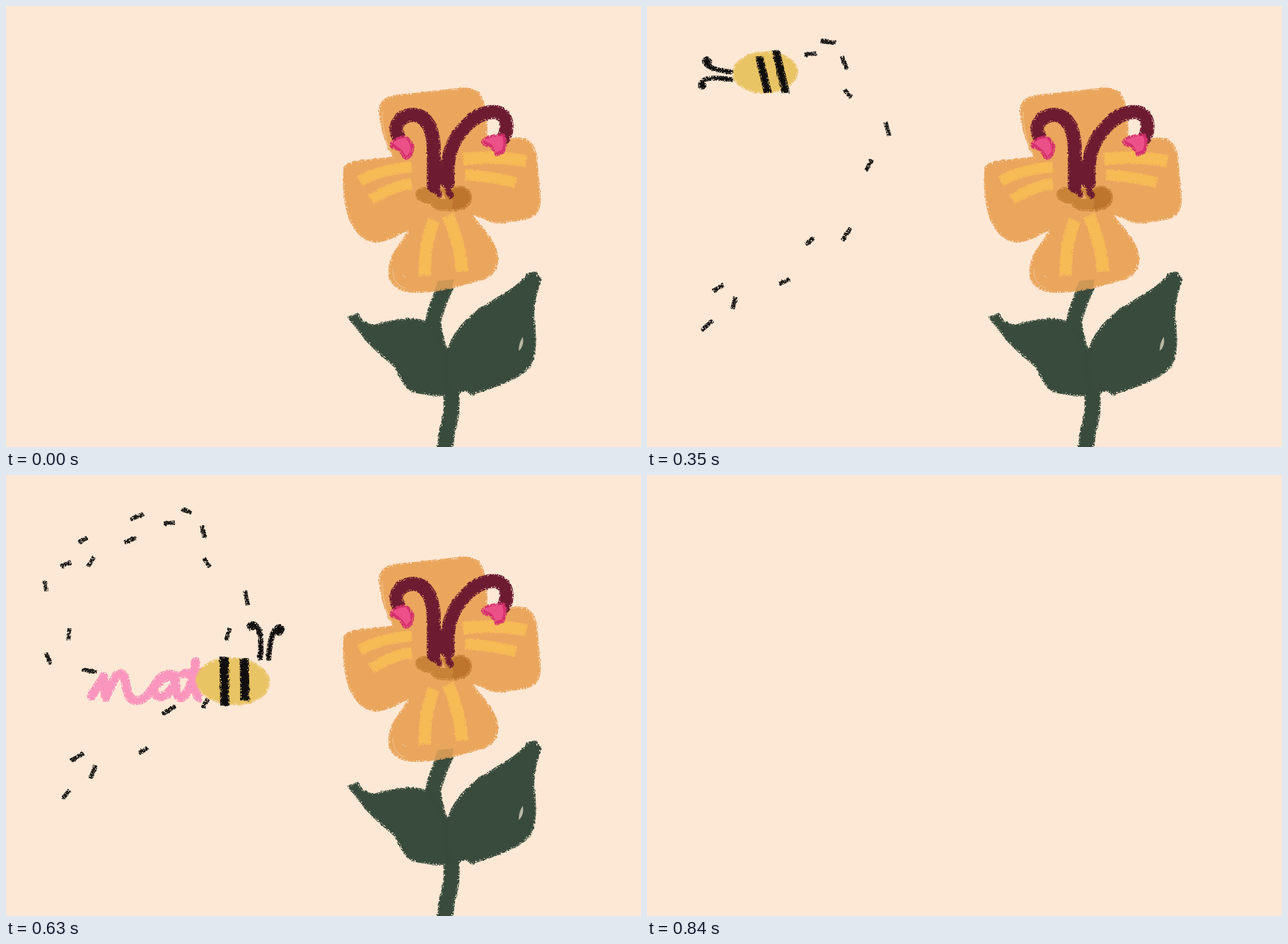
Write an HTML page that moves like this. It is 898x624 px and loops after 0.91 s.

```html
<!DOCTYPE html>
<html lang="en">
<head>
<meta charset="utf-8">
<title>Bee and flower</title>
<style>
html, body { margin: 0; width: 100%; height: 100%; overflow: hidden; background: #fde8d5; }
svg { display: block; width: 898px; height: 624px; }
.line { fill: none; stroke-linecap: round; stroke-linejoin: round; }
.band { fill: none; stroke-linecap: butt; }
</style>
</head>
<body>
<svg viewBox="0 0 898 624">
  <defs>
    <filter id="chalk" x="-20%" y="-20%" width="140%" height="140%" color-interpolation-filters="sRGB">
      <feTurbulence type="fractalNoise" baseFrequency=".2" numOctaves="2" seed="4" result="wave"/>
      <feDisplacementMap in="SourceGraphic" in2="wave" scale="3" xChannelSelector="R" yChannelSelector="G" result="rough"/>
      <feMorphology in="rough" operator="erode" radius="2" result="core"/>
      <feTurbulence type="fractalNoise" baseFrequency=".5" numOctaves="2" seed="9"/>
      <feColorMatrix values="0 0 0 0 0  0 0 0 0 0  0 0 0 0 0  5 0 0 0 -1.5" result="grain"/>
      <feComposite in="rough" in2="grain" operator="in" result="edge"/>
      <feMerge><feMergeNode in="edge"/><feMergeNode in="core"/></feMerge>
    </filter>
    <clipPath id="written"><rect id="reveal" x="0" y="240" height="110"/></clipPath>
  </defs>
  <rect width="898" height="624" fill="#fde8d5"/>

  <g id="scene">
    <g filter="url(#chalk)" fill="#384b3c">
      <path class="line" stroke="#384b3c" stroke-width="23" d="M627 385C619 402 608 425 604 447C605 480 625 505 629 540C632 570 628 590 624 600L620 632"/>
      <path d="M482 440L498 434C503 445 510 451 524 450C545 444 565 440 585 443C600 446 612 465 622 495C630 515 632 540 628 551C605 553 585 550 572 545C558 535 558 525 548 510C530 495 510 478 500 462Z"/>
      <path d="M621 505C623 470 645 445 672 426C700 408 728 395 736 378L750 375L758 388C750 405 745 430 748 450C751 475 750 495 742 510C730 528 690 540 658 551L650 545C640 550 630 552 626 548Z"/>
    </g>
    <path fill="#b9b8a4" d="M731 468Q733 482 725 488Q725 476 731 468Z"/>

    <path filter="url(#chalk)" fill="#eaa65d" d="M528 158C524 135 535 127 556 125L640 116C662 113 674 121 677 140C680 158 682 170 680 184L715 187C735 183 748 192 751 212L756 268C758 292 748 300 732 303L697 308C684 309 676 299 661 297C672 310 690 330 694 345C700 365 694 380 676 387L630 400C605 405 575 409 560 403C545 397 539 388 541 370C543 350 556 338 568 318C556 324 540 334 523 335C508 334 497 324 492 314C480 300 477 270 476 240C476 226 482 221 495 219L547 213C538 200 533 185 528 158Z"/>
    <path fill="#a9854c" opacity=".4" d="M611 389L633 387L631 400L605 404Z"/>
    <path class="line" stroke="#f4cfa0" stroke-width="1.2" opacity=".6" d="M532 150Q533 185 545 207M547 372Q547 394 564 399M561 381l4 3"/>

    <g filter="url(#chalk)" class="band" stroke="#f7bb56" stroke-width="16">
      <path d="M500 248Q530 231 574 228M516 274Q545 256 574 251M649 239Q688 241 721 250"/>
      <path stroke-width="18" d="M646 217Q692 211 736 220M605 303Q592 335 592 382M625 296Q642 335 645 376"/>
    </g>
    <g filter="url(#chalk)">
      <path fill="#c98339" d="M579 265C582 254 596 254 606 260L630 258C640 251 656 254 659 268C660 282 650 290 634 290C618 293 603 289 600 280C588 279 578 274 579 265Z"/>
      <path fill="#bd742d" d="M626 263C636 254 650 254 657 266C660 280 648 288 632 287C638 278 634 270 626 263Z"/>
    </g>
    <path fill="#eaa65d" d="M617 262L622 273L613 273Z"/>
    <g filter="url(#chalk)" class="line" stroke="#6c1b31" stroke-width="20">
      <path d="M555 185C547 170 557 154 577 154C598 156 605 180 605 205L605 255M625 250C621 215 632 187 652 168C670 150 695 144 704 157C710 166 708 178 704 186"/>
      <path stroke-width="9" d="M610 262L613 267M625 261L629 268"/>
    </g>
    <g filter="url(#chalk)" fill="#d6306f">
      <path d="M543 194Q549 184 564 183Q577 188 577 204Q574 217 566 218Q559 215 557 206L544 201Z"/>
      <path d="M671 191Q680 181 704 180Q711 192 705 208Q698 213 692 211L685 200Q674 201 671 191Z"/>
    </g>
    <path fill="#ec5089" d="M547 194Q554 187 565 187Q573 194 572 206L566 213L560 204ZM675 190Q686 184 701 184Q706 193 701 204L693 207L687 196Z"/>

    <g filter="url(#chalk)">
      <g clip-path="url(#written)">
        <path class="line" stroke="#fa95bd" stroke-width="13" d="M121 313L138 285L141 315C148 300 155 280 163 281C172 283 168 318 182 319C198 320 205 305 212 295C220 280 238 278 240 288C236 312 212 322 210 306C212 290 228 282 240 284Q238 316 248 315C260 310 267 280 268 264Q263 316 277 316Q290 308 294 286Q292 317 306 315Q320 308 326 286Q322 316 334 315Q344 305 346 284Q358 284 360 290Q358 318 372 314C388 308 402 300 400 290C398 278 380 286 381 302C383 318 400 318 412 308M251 281L288 278"/>
      </g>
    </g>
    <path id="trail" filter="url(#chalk)" class="band" stroke="#191716" stroke-width="6"/>
    <g id="bee">
      <ellipse id="body" filter="url(#chalk)" rx="48" ry="31" fill="#e9c465"/>
      <g filter="url(#chalk)" class="band" stroke="#100e0e">
        <path id="bands" stroke-width="12" d="M-13 -31V32M13 -30V24"/>
        <path id="feelers" class="line" stroke-width="7" d="M-5 0C-3 -22 -4 -38 -12 -43q-7 -3 -6 4q4 1 5 -3M6 0C7 -22 12 -40 20 -40q7 3 -1 8q-4 -1 -2 -5"/>
      </g>
    </g>
  </g>
</svg>
<script>
const STEP = 70, COUNT = 13;
const el = id => document.getElementById(id);
const set = (id, name, value) => el(id).setAttribute(name, value);
const show = (id, on) => { el(id).style.display = on ? '' : 'none'; };
const points = text => text.split(' ').map(p => p.split(',').map(Number));
const noise = n => {
  const v = Math.sin(n * 12.9898) * 43758.5453;
  return v - Math.floor(v) - .5;
};

// where the bee is at each step, then the marks it leaves on both sides
const flight = points('36,428 165,352 307,271 298,130 167,94 84,172 123,284 242,291 321,292 400,293 482,292');
const marks = points('85,452 123,420 101,399 194,390 230,333 282,323 314,225 340,174 284,124 279,80 256,51 ' +
  '231,68 185,59 176,92 109,92 120,123 85,126 56,157 89,225 60,260 118,277');

// each mark lies along the line between its neighbours and wobbles a little
function trail(step) {
  const count = Math.ceil(.2 * step * step + 1.65 * (step - 1));
  return marks.slice(0, Math.max(0, count)).map(([x, y], i) => {
    const [ax, ay] = marks[Math.max(0, i - 1)];
    const [bx, by] = marks[Math.min(marks.length - 1, i + 1)];
    const seed = i * 17 + step * 3;
    const angle = Math.atan2(by - ay, bx - ax) + noise(seed) * .3;
    const half = 9 + noise(seed + 1) * 4;
    const dx = half * Math.cos(angle), dy = half * Math.sin(angle);
    return `M${x - dx} ${y - dy}L${x + dx} ${y + dy}`;
  }).join('');
}

// the bee climbs, leans over through the loop, then flies level and writes
function placeBee(step) {
  const [x, y] = flight[step - 1];
  const level = step >= 7;
  const lean = level ? 0 : -62 * Math.max(0, step - 3);
  const tilt = level ? 3 : lean - 58;
  const slant = level ? 4 : -30 - lean / 3;
  const head = (level ? -37 : lean - 62) * Math.PI / 180;
  const size = level ? Math.min(1.1, .86 + .13 * (step - 7)) : .97;
  set('bee', 'transform', `translate(${x} ${y}) scale(${size})`);
  set('body', 'transform', `rotate(${tilt})`);
  set('bands', 'transform', `rotate(${tilt}) translate(${level ? 2 : -10}) skewX(${slant})`);
  set('feelers', 'transform', `translate(${50 * Math.cos(head)} ${50 * Math.sin(head)}) rotate(${lean * .7})`);
}

function draw(step) {
  const flying = step > 0 && step <= flight.length;
  show('scene', step < COUNT - 1);
  show('bee', flying);
  set('trail', 'd', trail(step));
  set('reveal', 'width', step < 7 ? 0 : 127 + 75 * (step - 7));
  if (flying) placeBee(step);
}

let shown = 0;
function tick(now) {
  const step = Math.floor(now / STEP) % COUNT;
  if (step !== shown) draw(shown = step);
  requestAnimationFrame(tick);
}
draw(0);
requestAnimationFrame(tick);
</script>
</body>
</html>
```
